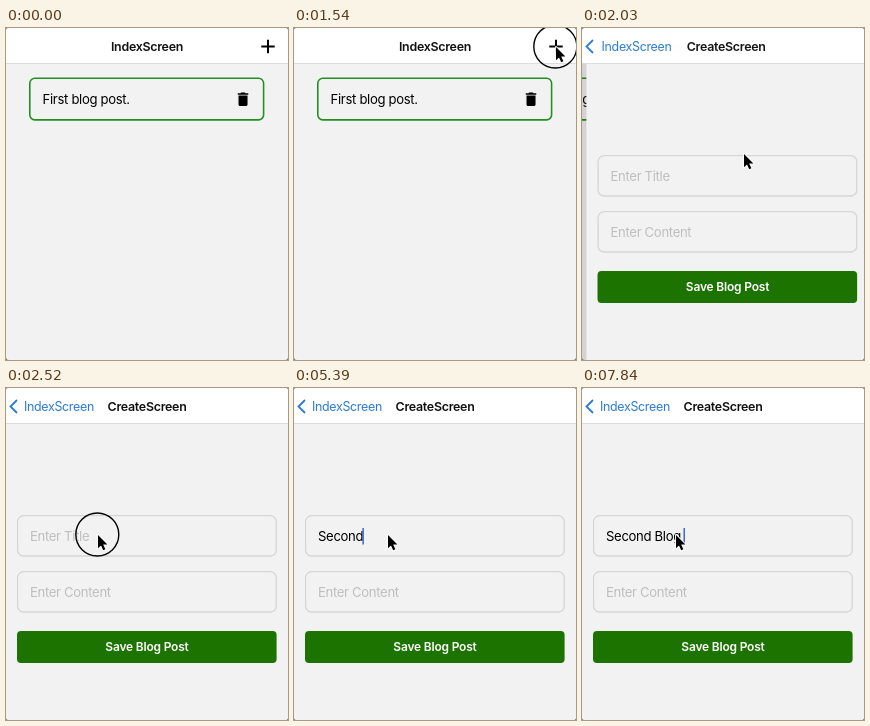
Recreate the animation shown at these times as an HTML page with a canvas. Size 282 px wide and 332 px high, loop 8000 ms.

```html
<!DOCTYPE html>
<html lang="en">
<head>
<meta charset="utf-8">
<title>Blog app</title>
<style>
  html, body { margin: 0; width: 100%; height: 100%; overflow: hidden; background: #f2f2f2; }
  canvas { display: block; width: 282px; height: 332px; }
</style>
</head>
<body>
<canvas id="stage"></canvas>
<script>
const W = 282, H = 332, LOOP = 8000, STEP = 70;
const canvas = document.getElementById('stage');
const ctx = canvas.getContext('2d');
const dpr = window.devicePixelRatio || 1;
canvas.width = W * dpr;
canvas.height = H * dpr;

const FAMILY = 'Inter, "Open Sans", sans-serif';
const FONT = {
  body: [`400 13.1px ${FAMILY}`, '-0.32px'],
  title: [`600 12.4px ${FAMILY}`, '-0.26px'],
  back: [`400 12.4px ${FAMILY}`, '-0.3px'],
  button: [`600 12px ${FAMILY}`, '-0.2px']
};
const BLUE = '#2a7bd6', PAPER = '#f2f2f2';

const TRASH = new Path2D('M6 19c0 1.1.9 2 2 2h8c1.1 0 2-.9 2-2V7H6v12zM19 4h-3.5l-1-1h-5l-1 1H5v2h14V4z');
const ARROW = new Path2D('M0 0V13.2L3 10.4L5.2 15.2L7.4 14.2L5.2 9.6H9.4Z');

// Pointer stops: time, x, y
const POINTER = [
  [0, 160, 334], [70, 161, 326], [420, 165, 190], [770, 168, 92], [840, 170, 81],
  [910, 173, 68], [1190, 236, 36], [1400, 262, 19], [1680, 262, 19],
  [1750, 256, 46], [1820, 244, 85], [1960, 190, 117], [2100, 134, 135],
  [2240, 99, 146], [2380, 92, 147], [2730, 92, 147], [2870, 94, 147]
];
const PRESSES = [[1470, 1680], [2450, 2660]];
const TYPED = 'Second Blog ';
const KEYS = [3360, 3780, 4060, 4690, 4900, 5250, 5460, 5880, 6510, 6790, 7420, 7770];
const FOCUS = 2800;

const clamp = v => Math.min(1, Math.max(0, v));
const slide = t => 1 - Math.pow(1 - clamp((t - 1730) / 370), 2.5);

function pointerAt(t) {
  const i = POINTER.findIndex(p => p[0] > t);
  if (i < 0) return POINTER[POINTER.length - 1].slice(1);
  const [t0, x0, y0] = POINTER[i - 1], [t1, x1, y1] = POINTER[i];
  const k = (t - t0) / (t1 - t0);
  return [x0 + (x1 - x0) * k, y0 + (y1 - y0) * k];
}

function text(str, x, y, font, color, align = 'left') {
  [ctx.font, ctx.letterSpacing] = font;
  ctx.fillStyle = color;
  ctx.textAlign = align;
  ctx.fillText(str, x, y);
}

function box(x, y, w, h, r, fill, stroke, width) {
  ctx.beginPath();
  ctx.roundRect(x, y, w, h, r);
  if (fill) { ctx.fillStyle = fill; ctx.fill(); }
  if (stroke) { ctx.strokeStyle = stroke; ctx.lineWidth = width; ctx.stroke(); }
}

function line(points, color, width) {
  ctx.beginPath();
  points.forEach(([x, y], i) => i ? ctx.lineTo(x, y) : ctx.moveTo(x, y));
  ctx.strokeStyle = color;
  ctx.lineWidth = width;
  ctx.stroke();
}

function at(x, y, draw) {
  ctx.save();
  ctx.translate(x, y);
  draw();
  ctx.restore();
}

function fade(alpha, draw) {
  if (alpha <= 0) return;
  ctx.save();
  ctx.globalAlpha = alpha;
  draw();
  ctx.restore();
}

function indexScreen() {
  box(23.8, 50.3, 233.8, 41.6, 5, null, '#219021', 1.6);
  text('First blog post.', 36.6, 76, FONT.body, '#000');
  at(228, 62.2, () => {
    ctx.scale(0.752, 0.752);
    ctx.fillStyle = '#000';
    ctx.fill(TRASH);
  });
}

function createScreen(t) {
  const border = '#d6d6d6';
  box(11.6, 127.6, 258.6, 40.4, 6, null, border, 1.3);
  box(11.6, 183.6, 258.6, 40.4, 6, null, border, 1.3);
  box(11, 243, 259.6, 32, 4, '#1c7300');
  text('Save Blog Post', 141, 263.3, FONT.button, '#fff', 'center');
  text('Enter Content', 24, 208.6, FONT.body, '#bfbfc1');

  const typed = TYPED.slice(0, KEYS.filter(k => k <= t).length);
  if (typed) text(typed, 24, 152.6, FONT.body, '#000');
  else text('Enter Title', 24, 152.6, FONT.body, '#bfbfc1');
  if (t >= FOCUS) {
    ctx.fillStyle = '#4165cf';
    ctx.fillRect(23.2 + (typed ? ctx.measureText(typed).width : 0), 140, 1.5, 16.5);
  }
}

function header(p) {
  ctx.fillStyle = '#fff';
  ctx.fillRect(0, 0, W, 35);
  ctx.fillStyle = '#d9d9d9';
  ctx.fillRect(0, 35, W, 0.8);

  fade(1 - p, () => text('IndexScreen', 141 - 74 * p, 23, FONT.title, '#111', 'center'));
  fade(1 - p * 1.75, () => {
    line([[255.3, 18.5], [268.7, 18.5]], '#000', 2);
    line([[262, 11.8], [262, 25.2]], '#000', 2);
  });
  fade(p, () => {
    line([[11, 12], [4.5, 18.5], [11, 25]], BLUE, 1.8);
    text('IndexScreen', 18 + 100 * (1 - p), 23, FONT.back, BLUE);
    text('CreateScreen', 141 + 204 * (1 - p), 23, FONT.title, '#111', 'center');
  });
}

function pointer(t) {
  if (t < STEP) return;
  const [x, y] = pointerAt(t);
  if (PRESSES.some(([a, b]) => t >= a && t < b)) {
    ctx.beginPath();
    ctx.arc(x - 0.7, y - 0.5, 21.5, 0, Math.PI * 2);
    ctx.strokeStyle = '#000';
    ctx.lineWidth = 1.4;
    ctx.stroke();
  }
  at(x, y, () => {
    ctx.lineJoin = 'round';
    ctx.strokeStyle = '#fff';
    ctx.lineWidth = 1.8;
    ctx.stroke(ARROW);
    ctx.fillStyle = '#000';
    ctx.fill(ARROW);
  });
}

function render(t) {
  const p = slide(t), left = W * (1 - p);
  ctx.setTransform(dpr, 0, 0, dpr, 0, 0);
  ctx.fillStyle = '#777';
  ctx.fillRect(0, 0, W, H);
  ctx.save();
  ctx.beginPath();
  ctx.roundRect(0, 0, W, H, 3);
  ctx.clip();
  ctx.fillStyle = PAPER;
  ctx.fillRect(0, 0, W, H);

  if (p < 1) {
    at(-0.3 * W * p, 0, indexScreen);
    fade(0.13 * p, () => {
      ctx.fillStyle = '#000';
      ctx.fillRect(0, 0, W, H);
    });
  }
  if (p > 0) {
    ctx.fillStyle = PAPER;
    ctx.fillRect(left, 0, W, H);
    at(left * 1.03, 0, () => createScreen(t));
  }
  header(p);
  pointer(t);
  ctx.restore();
}

function tick() {
  const t = performance.now() % LOOP;
  render(Math.min(Math.floor(t / STEP) * STEP, 7840));
  requestAnimationFrame(tick);
}
tick();
</script>
</body>
</html>
```
